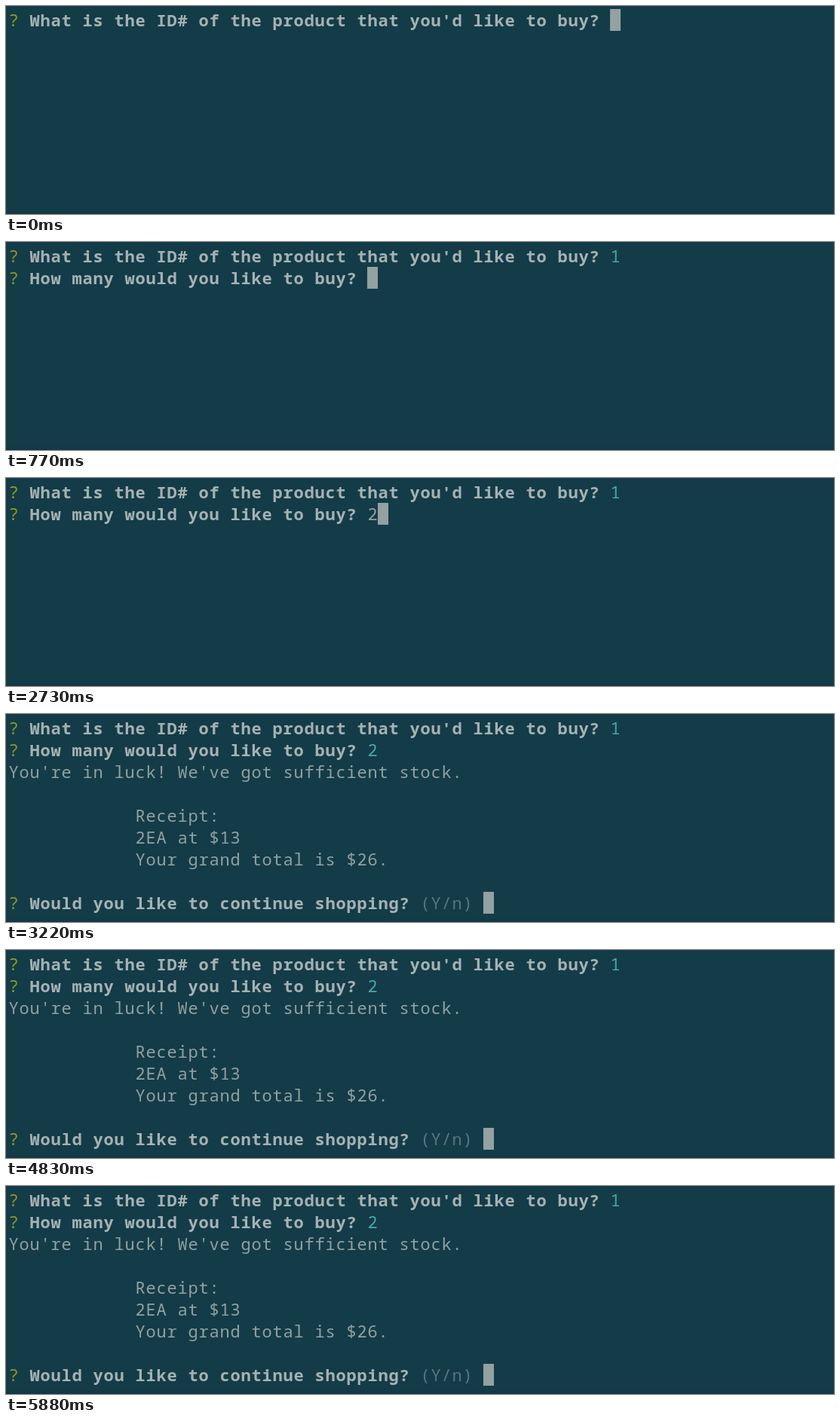
These frames come from a looping animation (1098 px wide and 276 px high, 5950 ms). An HTML page with a canvas:

```html
<!DOCTYPE html>
<html lang="en">
<head>
<meta charset="utf-8">
<title>Terminal shop</title>
<style>
  html, body { margin: 0; width: 100%; height: 100%; overflow: hidden; background: #133c48; }
  canvas { display: block; }
</style>
</head>
<body>
<canvas id="stage" width="1098" height="276"></canvas>
<script>
const ctx = document.getElementById('stage').getContext('2d');
const LOOP = 5950;
const CELL = { w: 14, h: 29, left: 3, top: 4, baseline: 23 };
const FAMILY = '"Noto Sans Mono", "DejaVu Sans Mono", monospace';
const STYLES = {
  mark:   { color: '#919b1c', weight: 400 },
  prompt: { color: '#a6b1b2', weight: 600 },
  plain:  { color: '#92a0a1', weight: 400 },
  answer: { color: '#4ba8a5', weight: 400 },
  hint:   { color: '#5b757e', weight: 400 }
};

const ask = (question, ...rest) => [['mark', '? '], ['prompt', question + ' '], ...rest];
const say = text => [['plain', text]];
const INDENT = ' '.repeat(12);
const ID_QUESTION = "What is the ID# of the product that you'd like to buy?";
const COUNT_QUESTION = 'How many would you like to buy?';
const idAnswered = ask(ID_QUESTION, ['answer', '1']);

// The cursor follows the last line of each screen.
const SCREENS = [
  { at: 0, lines: [ask(ID_QUESTION)] },
  { at: 490, lines: [ask(ID_QUESTION, ['plain', '1'])] },
  { at: 770, lines: [idAnswered, ask(COUNT_QUESTION)] },
  { at: 2730, lines: [idAnswered, ask(COUNT_QUESTION, ['plain', '2'])] },
  { at: 3220, lines: [
    idAnswered,
    ask(COUNT_QUESTION, ['answer', '2']),
    say("You're in luck! We've got sufficient stock."),
    [],
    say(INDENT + 'Receipt:'),
    say(INDENT + '2EA at $13'),
    say(INDENT + 'Your grand total is $26.'),
    [],
    ask('Would you like to continue shopping?', ['hint', '(Y/n) '])
  ] }
];

function drawLine(spans, row) {
  let col = 0;
  const y = CELL.top + row * CELL.h + CELL.baseline;
  for (const [name, text] of spans) {
    const { color, weight } = STYLES[name];
    ctx.font = `${weight} 22px ${FAMILY}`;
    ctx.fillStyle = color;
    for (const char of text) {
      ctx.fillText(char, CELL.left + (col + 0.5) * CELL.w, y);
      col++;
    }
  }
  return col;
}

function drawScreen({ lines }) {
  ctx.fillStyle = '#133c48';
  ctx.fillRect(0, 0, 1098, 276);
  ctx.fillStyle = '#123945';
  ctx.fillRect(0, 272, 1098, 4);
  ctx.textAlign = 'center';
  ctx.textBaseline = 'alphabetic';

  let col = 0;
  lines.forEach((spans, row) => { col = drawLine(spans, row); });
  ctx.fillStyle = '#93a1a1';
  ctx.fillRect(CELL.left + col * CELL.w, CELL.top + (lines.length - 1) * CELL.h, CELL.w, CELL.h);
}

const start = performance.now();
function tick() {
  const time = (performance.now() - start) % LOOP;
  drawScreen(SCREENS.filter(screen => screen.at <= time).pop());
  requestAnimationFrame(tick);
}
tick();
</script>
</body>
</html>
```
